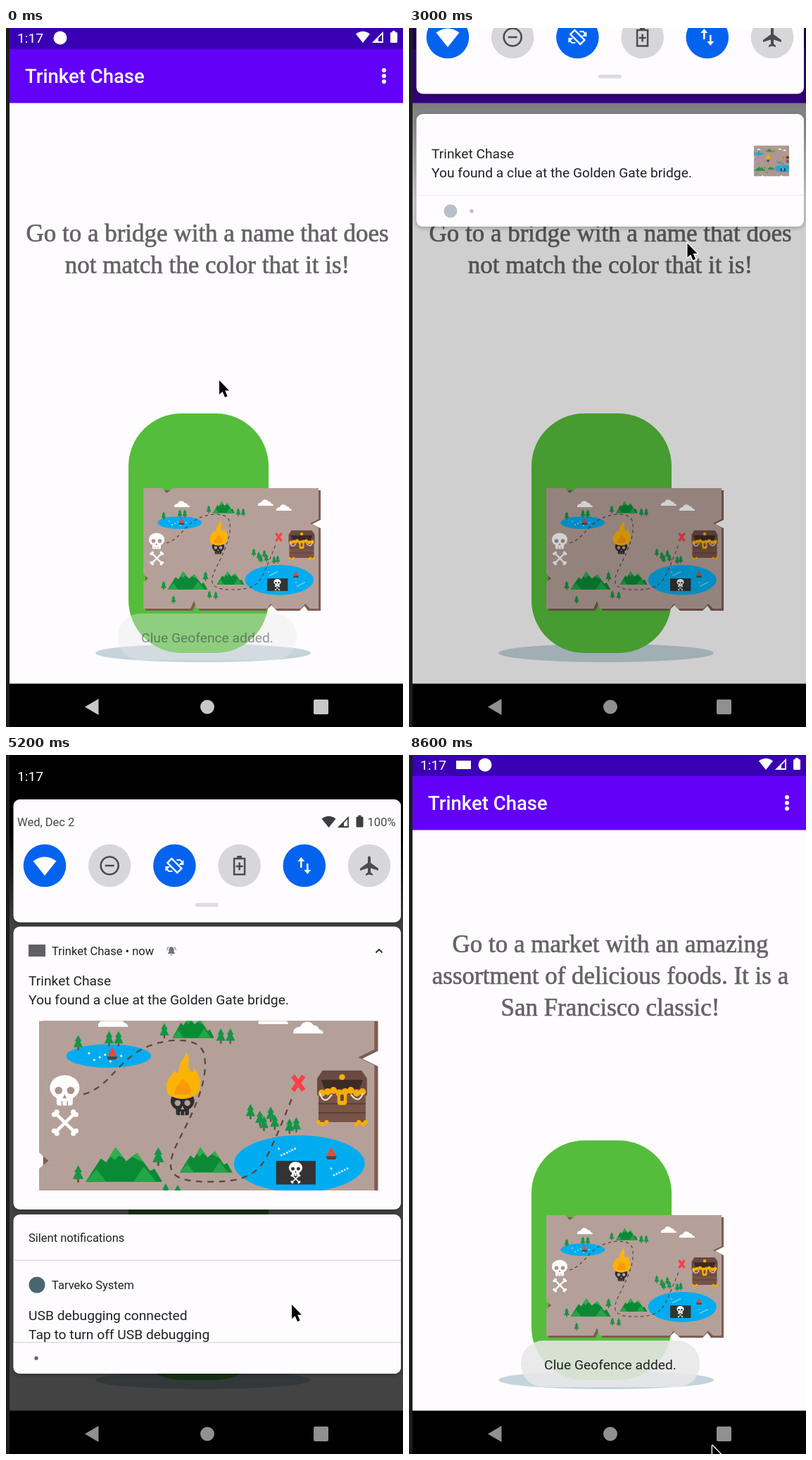
Recreate the animation shown at these times as an HTML page with a canvas. Size 564x992 px, loop 8700 ms.

```html
<!DOCTYPE html>
<html lang="en">
<head>
<meta charset="utf-8">
<title>Trinket Chase</title>
<style>
html, body { margin: 0; width: 100%; height: 100%; overflow: hidden; background: #000; }
canvas { display: block; width: 564px; height: 992px; }
</style>
</head>
<body>
<canvas id="stage" width="564" height="992"></canvas>
<script>
const ctx = document.getElementById('stage').getContext('2d');
const LOOP = 8700, STEP = 100;
const APP = 'Trinket Chase';
const SANS = 'Roboto, sans-serif', SERIF = '"Liberation Serif", serif';
const PAPER = '#fefcfe', INK = '#212124';

const clamp = v => Math.max(0, Math.min(1, v));
const lerp = (a, b, k) => a + (b - a) * k;
const smooth = k => k * k * (3 - 2 * k);

// Value of a track of [position, value] pairs
function track(t, keys, ease = k => k) {
  if (t <= keys[0][0]) return keys[0][1];
  for (let i = 1; i < keys.length; i++) {
    const [t0, a] = keys[i - 1], [t1, b] = keys[i];
    if (t <= t1) return lerp(a, b, ease((t - t0) / (t1 - t0)));
  }
  return keys[keys.length - 1][1];
}

function group(fn, alpha = 1) {
  ctx.save();
  ctx.globalAlpha *= alpha;
  fn();
  ctx.restore();
}
function rect(x, y, w, h, fill, r = 0) {
  ctx.fillStyle = fill;
  ctx.beginPath();
  ctx.roundRect(x, y, w, h, r);
  ctx.fill();
}
function oval(x, y, rx, ry, fill) {
  ctx.fillStyle = fill;
  ctx.beginPath();
  ctx.ellipse(x, y, rx, ry, 0, 0, 7);
  ctx.fill();
}
const dot = (x, y, r, fill) => oval(x, y, r, r, fill);
function fillPath(d, fill) {
  ctx.fillStyle = fill;
  ctx.fill(new Path2D(d));
}
function strokePath(d, color, w) {
  ctx.strokeStyle = color;
  ctx.lineWidth = w;
  ctx.stroke(new Path2D(d));
}
function text(s, x, y, size = 19.25, fill = INK, weight = 400, align = 'left', family = SANS) {
  ctx.font = `${weight} ${size}px ${family}`;
  ctx.textAlign = align;
  ctx.fillStyle = fill;
  ctx.fillText(s, x, y);
}
function at(x, y, fn, sx = 1, sy = sx) {
  group(() => { ctx.translate(x, y); ctx.scale(sx, sy); fn(); });
}

// ---- treasure map, 252 x 174 ----
function tree(x, y, s = 1) {
  at(x, y, () => {
    rect(-0.5, 2, 1, 3, '#6b4a35');
    fillPath('M0 -5 L2.2 -1 H1.2 L3 3 H-3 L-1.2 -1 H-2.2Z', '#149447');
  }, s);
}
function mountain(x, base, w, h) {
  at(x, base, () => {
    fillPath('M0 0 L20 -34 L27 -28 L39 -50 L53 -30 L67 -42 L84 -16 L90 -19 L100 0Z', '#0a8a35');
    fillPath('M30 -34 L39 -50 L49 -35 L43 -38 L38 -31 L34 -36Z M61 -36 L67 -42 L76 -28 L69 -32Z', '#2fae4f');
    fillPath('M0 0 L14 -18 L27 0Z M62 0 L76 -22 L92 0Z', '#24a548');
  }, w / 100, h / 50);
}
function skull(x, y, s, fill, hole) {
  at(x, y, () => {
    oval(0, -2, 11, 9.5, fill);
    rect(-6, 4, 12, 7.5, fill, 2);
    dot(-4.5, 0, 2.8, hole);
    dot(4.5, 0, 2.8, hole);
    fillPath('M0 3 L1.6 6 H-1.6Z', hole);
    strokePath('M-2 8V12 M2 8V12', hole, 0.8);
  }, s);
}
function bones(x, y, s) {
  at(x, y, () => {
    strokePath('M-7 -7 L7 7 M7 -7 L-7 7', '#fff', 2.6);
    for (const i of [-1, 1]) for (const j of [-1, 1]) {
      dot(i * 8.5, j * 6.5, 2, '#fff');
      dot(i * 6.5, j * 8.5, 2, '#fff');
    }
  }, s);
}
function boat(x, y) {
  at(x, y, () => {
    fillPath('M-4 2 H4 L3 4.5 H-3Z', '#5c4034');
    fillPath('M0 -5 L3.5 1.5 H-3.5Z', '#e64a32');
  });
}
function cloud(x, y) {
  fillPath(`M${x - 11} ${y + 5} a5 4 0 0 1 5 -5 a5.5 5.5 0 0 1 10 -1 a4 4 0 0 1 4 3 a4 3 0 0 1 3 3Z`, '#fff');
}
function chest() {
  at(206.5, 60, () => {
    fillPath('M4 0 H33 L37 6 V15 H0 V6Z', '#694a40');
    fillPath('M3 7 H34 L31 15 H6Z', '#3d2a26');
    rect(1, 19, 35, 20, '#785347');
    strokePath('M1 25H36 M1 32H36', '#5b3e36', 0.9);
    rect(0, 14, 37, 5, '#694a40', 1);
    for (let i = 0; i < 8; i++) dot(3.5 + i * 4.3, 17 - (i % 3), 2.6, '#f9ad05');
    for (let i = 0; i < 7; i++) dot([1, 4, 7, 29, 31, 34, 36][i], 39 + (i % 2) * 1.5, 1.6, '#f9ad05');
    strokePath('M2 17 Q5 27 11 18 M25 18 Q31 26 34 17', '#eadfd8', 1.2);
    rect(15, 15, 7, 11, '#f9ad05', 2);
    rect(17.2, 18, 2.6, 5, '#694a40', 1);
    dot(18.5, 5, 2.2, '#f9ad05');
  });
}
const TREES = [[29, 39], [52, 36], [59, 36], [93, 30], [135, 34], [142, 34], [157, 91], [164, 96], [172, 93],
  [167, 100], [175, 99], [186, 102], [191, 101], [94, 151], [103, 152], [43, 158]];

function map() {
  fillPath('M3 3 H252 V45 L240 51 L252 57 V174 H234 L229 167 L222 174 H190 L182 166 L174 174 H80 L75 163 L70 174 H3Z', '#7d5c53');
  fillPath('M0 0 H27 L33 7 L43 0 H249 V44 L237 50 L249 56 V171 H237 L230 164 L224 171 H187 L181 164 L176 171 H76 L72 160 L67 171 H0 V134 L7 128 L0 122Z', '#b4a098');
  cloud(55, 22);
  cloud(174, 20);
  cloud(200, 27);
  oval(51.7, 49, 31.5, 8.8, '#00acef');
  oval(193.3, 130.3, 48.6, 21.4, '#00acef');
  for (let i = 0; i < 7; i++) {
    dot(37 + i * 4, 48 + (i * 5 % 7) - 1, 0.8, '#fff');
    dot(178 + i * 2, 119 + (i * 5 % 6), 0.7, '#fff');
    dot(217 + i * 2, 134 + (i * 5 % 6), 0.7, '#fff');
  }
  mountain(99, 35.5, 31, 17);
  mountain(34.5, 144, 57, 26);
  mountain(104.5, 137, 39, 19);
  TREES.forEach(([x, y]) => tree(x, y, 1.15));
  tree(29, 138, 1.3);
  tree(88.5, 125, 1.4);
  group(() => {
    ctx.setLineDash([4.5, 4]);
    strokePath('M33 78 C50 73 56 58 70 48 C85 36 117 32 122 46 C128 66 112 96 104 112 C92 136 96 144 127 144 C152 144 163 139 171 121 C179 104 184 90 189 78', '#59463f', 1.2);
  });
  skull(19, 75, 1, '#fff', '#a8958e');
  bones(19.3, 99.4, 0.95);
  skull(106.5, 84.5, 0.8, '#2e2c2d', '#b4a098');
  fillPath('M96 78 C92 70 97 65 101 60 C102 63 104 62 104 58 C104 53 109 51 109 46 C114 52 108 56 113 61 C115 62 115 59 114 57 C121 64 121 74 117 78 C110 83 102 82 96 78Z', '#fdb306');
  fillPath('M101 78 C99 73 105 71 106 66 C111 69 114 73 112 78Z', '#f99a0b');
  strokePath('M188.5 64 L196.5 75 M196.5 64 L188.5 75', '#fb3f48', 3.4);
  chest();
  boat(54.4, 47.4);
  boat(217, 122.6);
  rect(176, 128.2, 29.4, 17.8, '#333335');
  skull(190.5, 134.2, 0.46, '#fff', '#333335');
  bones(190.5, 141.7, 0.35);
}

// ---- small icons ----
function wifi(x, y, w, fill) {
  at(x, y, () => fillPath('M-10 -4.5 Q0 -12 10 -4.5 L0 8Z', fill), w / 20);
}
function signal(x, y, fill) {
  fillPath(`M${x} ${y} L${x + 9} ${y - 9} V${y}Z`, fill);
  strokePath(`M${x + 2.5} ${y - 1} L${x + 15} ${y - 14} V${y - 1}Z`, fill, 1.8);
}
function battery(x, y, fill) {
  rect(x, y + 2, 10, 15, fill, 1.5);
  rect(x + 3, y, 4, 3, fill);
}
function cursor(x, y) {
  at(x, y, () => {
    const d = 'M0 0 V20 L4.6 16 L8 24 L11.6 22.4 L8.2 14.6 H14Z';
    ctx.lineJoin = 'round';
    strokePath(d, '#fff', 2.6);
    fillPath(d, '#000');
  });
}
function tileIcon(i, c) {
  if (i === 0) wifi(0, 1, 33, c);
  if (i === 1) strokePath('M12.5 0 A12.5 12.5 0 1 1 -12.5 0 A12.5 12.5 0 1 1 12.5 0 M-6.5 0H6.5', c, 2.6);
  if (i === 2) {
    strokePath('M-4 -10 L10 4 L4 10 L-10 -4Z', c, 2.4);
    strokePath('M3 -8 H8 L11 -5 M-3 8 H-8 L-11 5', c, 2.2);
    fillPath('M13 -8 V-1 H6Z M-13 8 V1 H-6Z', c);
  }
  if (i === 3) {
    strokePath('M-7.5 -10 H7.5 V12.5 H-7.5Z M0 -4.5V6.5 M-5 1H5', c, 2.5);
    rect(-3.5, -14, 7, 4, c);
  }
  if (i === 4) {
    strokePath('M-4.5 -6 V3 M4.5 -3 V6', c, 2.5);
    fillPath('M-9.5 -6 L-4.5 -12 L0.5 -6Z M-0.5 6 L4.5 12 L9.5 6Z', c);
  }
  if (i === 5) fillPath('M-2 -12 Q0 -15 2 -12 V-4 L13 4 V7 L2 3.5 V9.5 L5 12 V14 L0 12.5 L-5 14 V12 L-2 9.5 V3.5 L-13 7 V4 L-2 -4Z', c);
}

// ---- app screen ----
const CLUES = [
  [303, ['Go to a bridge with a name that does', 'not match the color that it is!']],
  [280, ['Go to a market with an amazing', 'assortment of delicious foods. It is a', 'San Francisco classic!']]
];
function app(t) {
  rect(0, 0, 564, 992, PAPER);
  rect(5, 0, 559, 30, '#3a00b3');
  rect(5, 30, 559, 76.5, '#6200f8');
  text(APP, 27, 78, 27.5, '#fff', 500);
  for (const y of [60, 68, 76]) dot(537, y, 3, '#fff');
  const [y0, lines] = CLUES[t < 6600 ? 0 : 1];
  lines.forEach((s, i) => {
    text(s, 286, y0 + i * 45, 35, '#656365', 400, 'center', SERIF);
    ctx.strokeStyle = '#656365';
    ctx.lineWidth = 0.7;
    ctx.strokeText(s, 286, y0 + i * 45);
  });
  oval(280, 887, 153, 13, '#c4d4da');
  rect(174, 547, 199, 340, '#55bd3c', 75);
  at(195, 653, map);

  const toast = t < 4000
    ? track(t, [[0, 0.45], [100, 0.8], [200, 1], [2200, 1], [2600, 0]])
    : track(t, [[6700, 0], [6800, 0.42], [7000, 1]]);
  if (toast) group(() => {
    group(() => rect(159, 831, 254, 66, '#e9e9e9', 32), 0.87);
    text('Clue Geofence added.', 286, 872, 19.25, '#222', 400, 'center');
  }, toast);
}
function statusBar(t) {
  if (t >= 800 && t < 4000) {
    rect(32, 8, 20, 12, '#fff');
    text(APP, 61, 20, 16.5, '#fff');
  } else {
    text('1:17', 16, 21, 19.25, '#fff');
    const late = t >= 4000;
    if (late) rect(67, 8, 21, 12, '#fff');
    dot(late ? 108 : 77, 14, 9.5, '#fff');
  }
  wifi(507, 13, 20, '#fff');
  signal(520, 21, '#fff');
  battery(546, 4, '#fff');
}

// ---- notifications ----
function card(top, bottom, blur = 6, shadow = 0.3) {
  group(() => {
    ctx.shadowColor = `rgba(0,0,0,${shadow})`;
    ctx.shadowBlur = blur;
    ctx.shadowOffsetY = blur / 4;
    rect(10.5, top, 550.5, bottom - top, PAPER, 9);
  });
}
function clipCard(top, bottom, fn) {
  group(() => {
    ctx.beginPath();
    ctx.roundRect(10.5, top, 550.5, bottom - top, 9);
    ctx.clip();
    fn();
  });
}
function thumb(y) {
  group(() => {
    ctx.beginPath();
    ctx.rect(490, y, 50, 44);
    ctx.clip();
    at(483.1, y, map, 0.253);
  });
}
function message(y) {
  text(APP, 32, y);
  text('You found a clue at the Golden Gate bridge.', 32, y + 27);
}
function headsUp(top) {
  card(top, top + 108, 30, 0.16);
  message(top + 48.5);
  thumb(top + 30);
}
function quickSettings() {
  const c = '#3d3d40';
  card(63, 237.5);
  text('Wed, Dec 2', 16, 100.5, 16.5, '#48484b');
  wifi(458.5, 95, 20, c);
  signal(471, 103, c);
  battery(497.5, 85.5, c);
  text('100%', 553.5, 100.5, 16.5, '#48484b', 400, 'right');
  for (let i = 0; i < 6; i++) {
    const on = i % 2 === 0;
    at(55 + i * 92.2, 157, () => {
      dot(0, 0, 30.3, on ? '#0463ee' : '#d7d6d8');
      tileIcon(i, on ? '#fff' : '#4c4c4e');
    });
  }
  rect(269, 210, 33, 5.5, '#dddce0', 2.7);
}
function shelf(bottom, dotX, iconX) {
  rect(10.5, bottom - 44, 550.5, 44, PAPER);
  rect(10.5, bottom - 45, 550.5, 1.3, '#d9d8da');
  if (iconX) dot(iconX, bottom - 22, 9.5, '#4a6572');
  dot(dotX, bottom - 22, 2.7, '#666568');
}
function notification(bottom, p) {
  const top = lerp(41, 243.5, p), end = Math.min(bottom, 645);
  card(top, end);
  clipCard(top, end, () => {
    group(() => {
      rect(32, top + 25.5, 24, 17, '#606163');
      text(APP + ' • now', 65, top + 40.5, 16.5);
      at(235, top + 34.5, () => {
        fillPath('M-5 4 V3 L-3.6 1.6 V-2 Q-3.6 -5 0 -6 Q3.6 -5 3.6 -2 V1.6 L5 3 V4Z M-1.5 5 H1.5 L0 6.8Z', '#747476');
        strokePath('M-6.3 -1 Q-6 -4 -4.2 -5.6 M6.3 -1 Q6 -4 4.2 -5.6', '#747476', 1.1);
      });
      strokePath(`M525.5 ${top + 37} l4.5 -4.5 l4.5 4.5`, INK, 1.8);
    }, clamp(2 * p - 1));
    message(top + lerp(48.5, 83.5, p));
    const fade = bottom < 481 ? 1 - 0.6 * p : 0.4 * clamp(1 - (bottom - 481) / 80);
    if (fade) group(() => thumb(top + lerp(30, 66, p)), fade);
    group(() => {
      ctx.beginPath();
      ctx.rect(46.5, top + 134, 482, 240.5);
      ctx.clip();
      at(47, top + 91.5, map, 1.913, 1.88);
    }, clamp(0.8 * p + (bottom - 481) / 400));
    if (bottom < 645) {
      const x = track(bottom, [[481, 59], [584, 48], [645, 43]]);
      group(() => shelf(bottom, x + 30, x), p);
    }
  });
}
function silentCard(bottom) {
  if (bottom < 656) return;
  card(652, bottom);
  clipCard(652, bottom, () => {
    text('Silent notifications', 32, 690.5, 16.5);
    rect(10.5, 716.5, 550.5, 1.3, '#d5d4d6');
    dot(44, 752, 11.5, '#4a6572');
    text('Tarveko System', 65, 758, 16.5);
    text('USB debugging connected', 32, 802);
    text('Tap to turn off USB debugging', 32, 829);
    shelf(bottom, bottom < 775 ? 73 : 43, bottom < 775 ? 43 : 0);
  });
}
function shade(t) {
  const bottom = track(t, [[2800, 149], [3300, 481], [4100, 584], [4500, 700], [4900, 878], [6700, 878], [6800, 836], [7100, 0]]);
  const closing = t > 6700;
  const p = closing ? 1 : clamp((bottom - 149) / 332);
  const dark = closing ? clamp(bottom / 481) : p;
  const scrim = track(bottom, [[149, 0], [481, 0.45], [584, 0.64], [650, 0.735]]);
  rect(5, 0, 559, 931, `rgba(0,0,0,${scrim})`);
  group(() => {
    const g = ctx.createLinearGradient(0, 63, 0, 240);
    g.addColorStop(0, '#000');
    g.addColorStop(0.25, '#000');
    g.addColorStop(1, 'rgba(0,0,0,0)');
    rect(5, 0, 559, 240, g);
    text('1:17', 16, 37, 19.25, '#fff');
  }, dark);
  const low = closing ? Math.max(bottom, 481) : bottom;
  at(0, bottom - low, () => {
    at(0, (p - 1) * 240, quickSettings);
    notification(low, p);
    silentCard(low);
  });
}
function navBar(t) {
  rect(0, 930.5, 564, 61.5, '#000');
  const v = track(t, [[200, 200], [500, 144]]);
  const c = `rgb(${v},${v},${v})`;
  fillPath('M112 963.5 L131.5 952 V975Z', c);
  dot(286, 963.5, 10, c);
  rect(437, 953, 21, 21, c, 2);
}

const MOUSE_X = [[500, 303], [1500, 355], [2700, 355], [3300, 436], [4100, 441], [4800, 406], [5500, 406], [6300, 437], [7300, 437], [8000, 431]];
const MOUSE_Y = [[500, 500], [1500, 133], [2700, 133], [3300, 478], [4100, 597], [4800, 780], [5500, 780], [6300, 498], [7300, 498], [8000, 975], [8600, 980]];

function draw(t) {
  app(t);
  statusBar(t);
  if (t >= 700 && t < 2800) headsUp(track(t, [[700, -125], [1100, 41]], smooth));
  if (t >= 2800 && t < 7100) shade(t);
  navBar(t);
  rect(0, 0, 5, 992, '#1d1d1f');
  cursor(track(t, MOUSE_X, smooth), track(t, MOUSE_Y, smooth));
}
function loop() {
  const t = performance.now() % LOOP;
  draw(Math.floor(t / STEP) * STEP);
  requestAnimationFrame(loop);
}
loop();
</script>
</body>
</html>
```
